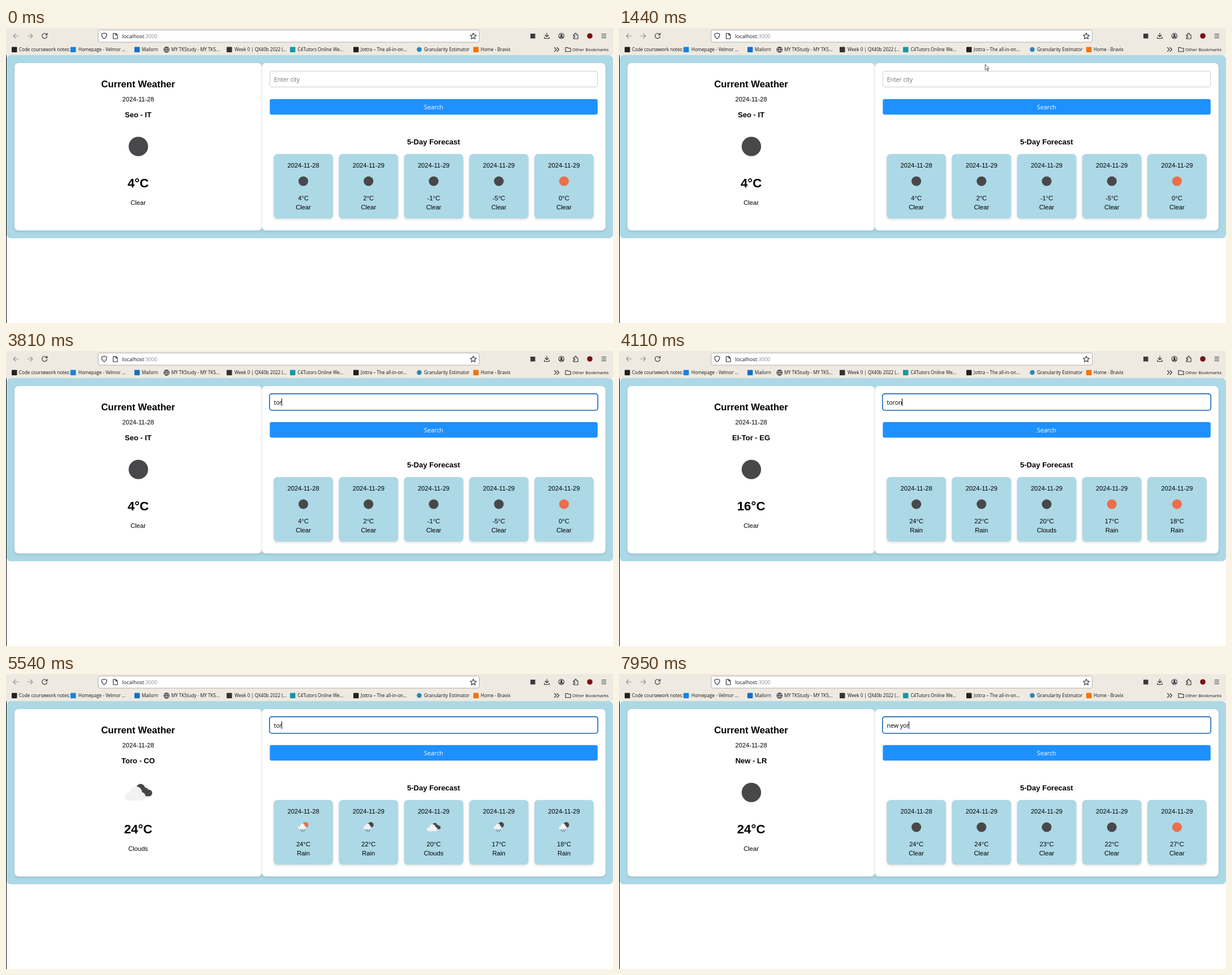
Recreate the animation shown at these times as an HTML page. Size 1073 by 522 pixels, loop 8 s.

```html
<!DOCTYPE html>
<html lang="en">
<head>
<meta charset="utf-8">
<title>Weather</title>
<style>
  html, body { margin: 0; width: 100%; height: 100%; overflow: hidden; background: #fff; }
  svg { display: block; width: 1073px; height: 522px; font: 11.15px "Liberation Sans", Arial, sans-serif; }
  text { white-space: pre; }
  .mid { text-anchor: middle; }
  .b { font-weight: bold; }
  .ui { font-family: "Open Sans", "Noto Sans", sans-serif; }
  .field { font-size: 10.8px; letter-spacing: -.12px; }
  .card { filter: drop-shadow(0 2px 2px rgba(0, 0, 0, .12)); }
  .line { fill: none; stroke: #2b2a33; stroke-width: 1.1; stroke-linecap: round; stroke-linejoin: round; }
</style>
</head>
<body>
<svg viewBox="0 0 1073 522">
  <g id="fixed"></g>
  <g id="weather"></g>
  <rect id="button" x="466.3" y="125.7" width="579.5" height="27.6" rx="3.3"/>
  <text class="ui mid" x="755.7" y="143.6" font-size="10.8" fill="#fff">Search</text>
  <rect id="box" fill="#fff"/>
  <text id="typed" class="ui field" x="473.5" y="95"></text>
  <rect id="caret" y="84" width="1" height="13"/>
  <g id="mouse"></g>
</svg>
<script>
const $ = id => document.getElementById(id);
const LOOP = 8000, DARK = '#48484a', ORANGE = '#ec6e4c';

const rect = (x, y, w, h, r, fill, more = '') =>
  `<rect x="${x}" y="${y}" width="${w}" height="${h}" rx="${r}" fill="${fill}" ${more}/>`;
const disc = (x, y, r, fill) => `<circle cx="${x}" cy="${y}" r="${r}" fill="${fill}"/>`;
const text = (x, y, s, cls = '', size = 11.15, fill = '#000') =>
  `<text x="${x}" y="${y}" class="${cls}" font-size="${size}" fill="${fill}">${s}</text>`;
const line = (d, more = '') => `<path class="line" d="${d}" ${more}/>`;

// Browser bars
const bookmarks = [
  [10, 23, '#222', 'Code coursework notes:'],
  [114, 128, '#1683e2', 'Homepage - Velmor ...'],
  [227, 240, '#1470c8', 'Mailorn'],
  [0, 292, '', 'MY TKStudy - MY TKS...'],
  [390, 404, '#333', 'Week 0 | QX40b 2022 (...'],
  [502, 515.5, '#1698a8', 'C4Tutors Online We...'],
  [614, 627, '#222', 'Jottra – The all-in-on...'],
  [726, 739, '#2a86b8', 'Granularity Estimator'],
  [826, 839, '#f2730c', 'Home - Bravix']
];

function toolbar() {
  const gray = 'style="stroke:#96938e"';
  let s = rect(0, 0, 1073, 48, 0, '#eeeae1');
  s += rect(163, 3.5, 673.5, 21.5, 3, '#fff', 'stroke="#b4b0aa"');
  s += line('M22 14H13m4-4l-4 4 4 4', gray) + line('M38 14h9m-4-4l4 4-4 4', gray);
  s += line('M72 11.5a4.5 4.5 0 1 0 .6 3.5M72.8 9v3.2h-3.2');
  s += line('M173.500 9l4.500 1.500c0 5-1.500 7-4.500 8.500-3-1.500-4.500-3.500-4.500-8.500z');
  s += line('M189.500 9.500h4.500l3 3v6.500h-7.500zM194 9.500v3h3');
  s += line('M826 9l1.600 3.500 3.800.4-2.800 2.600.8 3.800-3.400-2-3.400 2 .8-3.800-2.800-2.600 3.800-.4z');
  s += text(205.5, 18, 'localhost<tspan fill="#8c8b90">:3000</tspan>', 'ui', 9.2, '#15141a');
  s += rect(927, 10, 8.5, 8.5, 0, '#3b3a40');
  s += line('M956 9v6.500m-3-3l3 3 3-3M951.800 16v2.500h8.400V16');
  s += line('M986.500 14a4.700 4.700 0 1 0-9.400 0a4.700 4.700 0 1 0 9.400 0') + disc(981.8, 12.6, 1.9, '#2b2a33')
     + '<path d="M978.500 17a3.300 2.500 0 0 1 6.600 0z" fill="#2b2a33"/>';
  s += line('M1003 12h2.500v-1.500a1.400 1.400 0 0 1 2.800 0V12h2.700v7h-8v-2.300h1.300a1.300 1.300 0 0 0 0-2.600H1003z');
  s += disc(1032, 14, 4.8, '#7c0f16');
  s += line('M1053 10.800h7.500m-7.500 3.200h7.500m-7.500 3.200h7.500');
  for (const [x, tx, color, name] of bookmarks) {
    if (color) s += x == 726 ? disc(730.5, 38, 4.3, color) : rect(x, 33.5, 9.5, 9.5, 1, color);
    s += text(tx, 41, name, 'ui', 8.05, '#15141a');
  }
  s += line('M288.500 38.300a4.700 4.700 0 1 0-9.400 0a4.700 4.700 0 1 0 9.400 0M279.100 38.300h9.400M283.800 33.600q-4 4.700 0 9.400q4-4.700 0-9.400');
  s += line('M969.500 34.500l3.500 3.500-3.500 3.500m4.500-7l3.500 3.500-3.500 3.500');
  s += line('M989 34.500h3.500l1.300 1.300h4.200v6h-9z');
  return s + text(1001, 41, 'Other Bookmarks', 'ui', 7.8, '#15141a');
}

const cardX = i => 473.2 + 115.2 * i;
const mid = i => cardX(i) + 52.4;

function page() {
  let s = rect(0, 48, 1, 474, 0, '#000') + rect(1, 48, 1072, 324, 7, '#add8e6');
  s += rect(15, 62, 437.3, 296.3, 7, '#fff', 'class="card"') + rect(452.3, 62, 607.4, 296.3, 7, '#fff', 'class="card"');
  s += text(233.6, 105, 'Current Weather', 'b mid', 16.72) + text(233.6, 130, '2024-11-28', 'mid');
  s += text(755.8, 206, '5-Day Forecast', 'b mid', 13.05);
  for (let i = 0; i < 5; i++) {
    s += rect(cardX(i), 223, 104.8, 114.3, 6.5, '#add8e6', 'class="card"');
    s += text(mid(i), 247, i ? '2024-11-29' : '2024-11-28', 'mid');
  }
  return s;
}

// Weather icons, centred on 0,0: n/d clear, c clouds, r/o rain by night or day
const cloud = '<g fill="#f2f2f2"><circle cx="-4" cy="0" r="10.5"/><circle cx="-17" cy="7.500" r="7"/>' +
  '<circle cx="5" cy="7" r="7.500"/><path d="M-17 2H5v12.500H-17z"/></g>';
function icon(kind, x, y, k) {
  let s = '';
  if (kind == 'n' || kind == 'd') s = disc(0, 0, 17.2, kind == 'n' ? DARK : ORANGE);
  if (kind == 'c') s = disc(4, -7, 8, DARK) + disc(12, -2, 6.5, DARK) + disc(18.7, 1, 5.8, DARK) +
    rect(6, 0, 13, 6.8, 0, DARK) + cloud;
  if (kind == 'r' || kind == 'o') s = disc(8, -8, 10, kind == 'r' ? DARK : ORANGE) +
    `<g transform="translate(0 -4) scale(.76)">${cloud}</g>` +
    '<path d="M-9 9l-1 3M-2 9l-1 3M5 9l-1 3M-5 14l-1 3M2 14l-1 3" stroke="#48484a" stroke-width="2.200"/>';
  return `<g transform="translate(${x} ${y}) scale(${k})">${s}</g>`;
}

const five = s => Array(5).fill(s);
const places = {
  seo: { name: 'Seo - IT', temp: 4, sky: 'Clear', icon: 'n', temps: [4, 2, -1, -5, 0], skies: five('Clear'), icons: 'nnnnd' },
  eltor: { name: 'El-Tor - EG', temp: 16, sky: 'Clear', icon: 'n', temps: [16, 16, 15, 17, 21], skies: five('Clear'), icons: 'nnndd' },
  toro: { name: 'Toro - CO', temp: 24, sky: 'Clouds', icon: 'c', temps: [24, 22, 20, 17, 18],
    skies: ['Rain', 'Rain', 'Clouds', 'Rain', 'Rain'], icons: 'orcrr' },
  toronto: { name: 'Toronto - CA', temp: 3, sky: 'Clouds', icon: 'c', temps: [3, 3, 2, 1, 1], skies: five('Clouds'), icons: 'ccccc' },
  newLR: { name: 'New - LR', temp: 24, sky: 'Clear', icon: 'n', temps: [24, 24, 23, 22, 27], skies: five('Clear'), icons: 'nnnnd' }
};

// Timelines: [ms, value], held until the next entry
const current = [[0, 'seo'], [4020, 'eltor'], [4150, 'toro'], [4320, 'toronto'], [5420, 'toro'], [5650, 'eltor'], [6980, 'newLR']];
const forecast = [[0, 'seo'], [4050, 'eltor'], [4090, 'toro'], [4320, 'toronto'], [5470, 'toro'], [5710, 'eltor'], [7040, 'newLR']];
const pictures = [[0, 'seo'], [4050, 'eltor'], [4190, 'toro'], [4320, 'toronto'], [5500, 'toro'], [5710, 'eltor'], [7100, 'newLR']];
const typing = [[0, ''], [3520, 't'], [3660, 'to'], [3810, 'tor'], [3870, 'toro'], [4050, 'toron'], [4190, 'toront'], [4300, 'toronto'],
  [5120, 'toront'], [5200, 'toron'], [5270, 'toro'], [5340, 'tor'], [5880, 'to'], [5930, 't'], [5990, ''],
  [6510, 'n'], [6720, 'ne'], [6820, 'new'], [6920, 'new '], [7550, 'new y'], [7640, 'new yo'], [7950, 'new yor']];
const caretOn = [[0, 0], [1650, 1], [2190, 0], [2740, 1], [3280, 0], [3520, 1], [4840, 0], [5120, 1], [6440, 0], [6510, 1], [7460, 0], [7550, 1]];
const path = [[140, 988, 491], [230, 912, 381], [510, 912, 381], [630, 787, 195.5], [880, 787, 195.5], [881, 750, 140],
  [920, 671.5, 20], [950, 667, 6], [1010, 656, 33], [1220, 656, 33], [1600, 641, 87], [3520, 641, 87]];

const held = (list, t) => list.findLast(e => e[0] <= t)[1];

function weather(t) {
  const now = places[held(current, t)], next = places[held(forecast, t)], pics = places[held(pictures, t)].icons;
  let s = text(233.6, 158, now.name, 'b mid', 13.05) + icon(now.icon, 234, 209.6, 1);
  s += text(233.6, 282, now.temp + '°C', 'b mid', 22.3) + text(233.6, 312.500, now.sky, 'mid');
  for (let i = 0; i < 5; i++) {
    s += icon(pics[i], mid(i), 271, .5);
    s += text(mid(i), 304.500, next.temps[i] + '°C', 'mid') + text(mid(i), 320.800, next.skies[i], 'mid');
  }
  return s;
}

function mouse(t) {
  const i = path.findIndex(p => p[0] > t);
  if (i < 1) return '';
  const [t0, x0, y0] = path[i - 1], [t1, x1, y1] = path[i], k = (t - t0) / (t1 - t0);
  const x = x0 + (x1 - x0) * k, y = y0 + (y1 - y0) * k;
  const inField = y > 76 && y < 105;
  let s = '<path d="M0 0v10l2.400-2.200 1.700 3.800 1.600-.7-1.700-3.700H7z" fill="#fff" stroke="#000" stroke-width=".7"/>';
  if (y < 26 || inField || (y > 190 && y < 206 && x < 803))
    s = `<path d="M-2-4.300h4M0-4.300v8.600M-2 4.300h4" fill="none" stroke="${inField ? '#69a5e8' : '#222'}"/>`;
  else if (y > 126 && y < 153)
    s = '<path d="M-1 6V0q1-1.300 2 0v3.500l5 1v4l-1.500 3H0L-3.500 7z" fill="#fff" stroke="#000" stroke-width=".7"/>';
  return `<g transform="translate(${x} ${y})">${s}</g>`;
}

function set(node, attrs) {
  for (const k in attrs) node.setAttribute(k, attrs[k]);
}

let shown;
function draw(t) {
  const s = weather(t);
  if (s != shown) $('weather').innerHTML = shown = s;

  const hover = t < 880 ? 0 : Math.max(0, Math.min(1, (1010 - t) / 80));
  set($('button'), { fill: `rgb(${30 - 30 * hover},${144 - 29 * hover},${255 - 25 * hover})` });

  const focus = t >= 1650;
  set($('box'), focus
    ? { x: 465.8, y: 75.6, width: 580.4, height: 29.4, rx: 4.2, stroke: '#1763b8', 'stroke-width': 1.6 }
    : { x: 466.5, y: 76.5, width: 579, height: 27.8, rx: 3.5, stroke: '#ccc', 'stroke-width': 1 });

  const word = held(typing, t), typed = $('typed');
  typed.textContent = word || 'Enter city';
  set(typed, { fill: word ? '#000' : '#757575' });
  const end = word ? Math.round(473 + typed.getComputedTextLength()) : 473;
  set($('caret'), { x: end, opacity: held(caretOn, t) });
  $('mouse').innerHTML = mouse(t);
}

$('fixed').innerHTML = toolbar() + page();
const start = performance.now();
function tick() {
  draw((performance.now() - start) % LOOP);
  requestAnimationFrame(tick);
}
tick();
</script>
</body>
</html>
```
